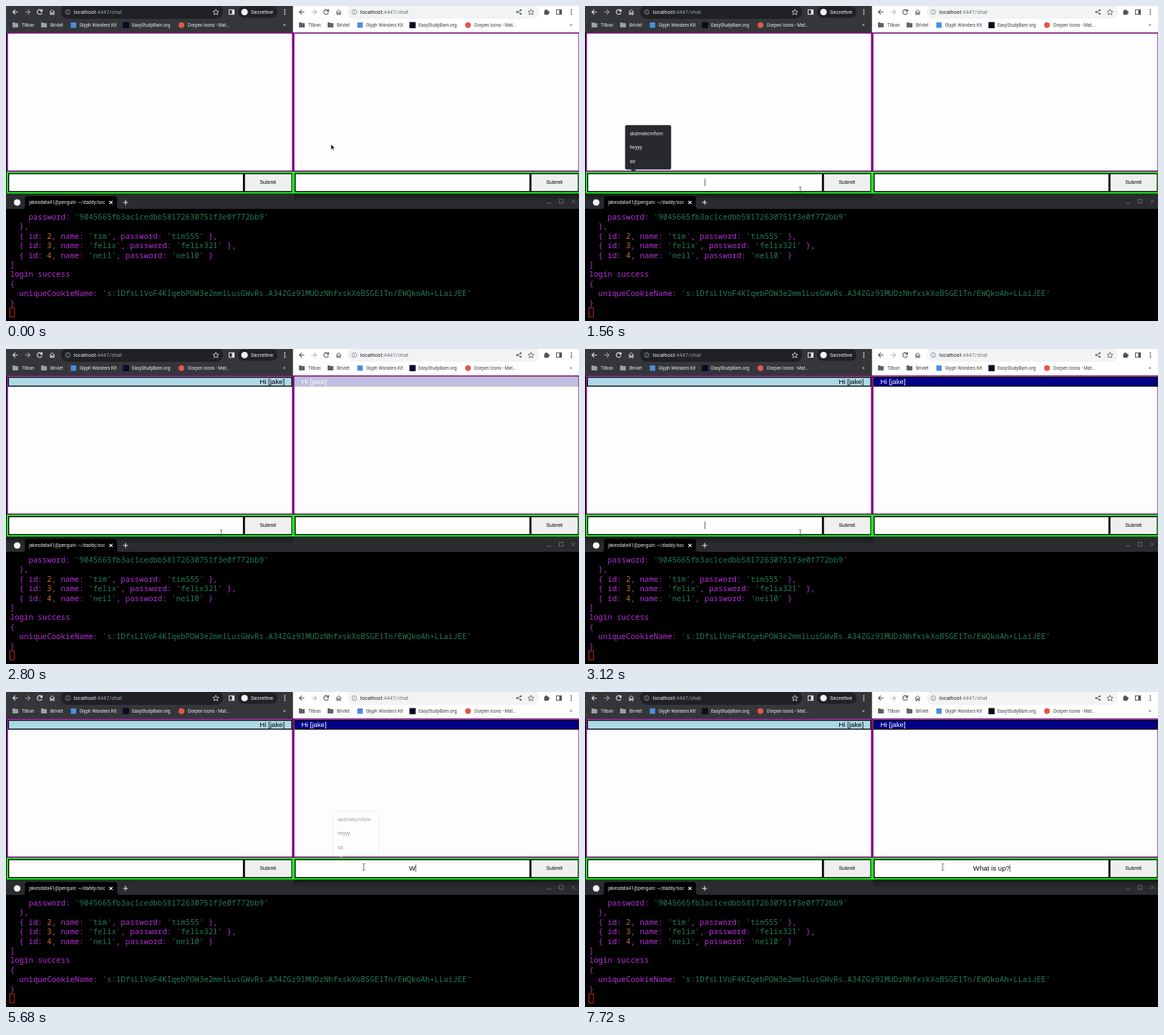
An HTML page that plays this animation: 800x441 px, repeating every 8 s.

```html
<!DOCTYPE html>
<html lang="en">
<head>
<meta charset="utf-8">
<title>Chat demo</title>
<style>
html, body { margin: 0; width: 100%; height: 100%; overflow: hidden; background: #000; }
svg { display: block; width: 800px; height: 441px; }
text { white-space: pre; }
.ui { font-family: Roboto, sans-serif; }
.page { font-family: "Liberation Sans", Arial, sans-serif; }
.term { font: 10.74px "Noto Sans Mono", monospace; }
</style>
</head>
<body>
<svg id="stage" viewBox="0 0 800 441" xmlns="http://www.w3.org/2000/svg">
  <defs>
    <linearGradient id="shade" x1="0" y1="0" x2="0" y2="1">
      <stop offset="0" stop-color="#000" stop-opacity=".4"/>
      <stop offset="1" stop-color="#000" stop-opacity="0"/>
    </linearGradient>
    <clipPath id="tabClip"><rect x="30" y="266" width="108" height="18"/></clipPath>
  </defs>
</svg>
<script>
const NS = 'http://www.w3.org/2000/svg';
const stage = document.getElementById('stage');
const LOOP = 8000;

function add(parent, tag, attrs, content) {
  const el = document.createElementNS(NS, tag);
  for (const k in attrs) el.setAttribute(k, attrs[k]);
  if (content !== undefined) el.textContent = content;
  parent.appendChild(el);
  return el;
}
const group = (parent, attrs) => add(parent, 'g', attrs || {});
const rect = (p, x, y, width, height, fill, more) => add(p, 'rect', { x, y, width, height, fill, ...more });
const line = (p, d, stroke, w, more) => add(p, 'path', { d, stroke, 'stroke-width': w, fill: 'none', ...more });
const dot = (p, cx, cy, r, fill) => add(p, 'circle', { cx, cy, r, fill });
const label = (p, x, y, size, fill, str, cls, more) =>
  add(p, 'text', { x, y, 'font-size': size, fill, class: cls || 'ui', ...more }, str);

const STAR = 'M293 4.6l1.2 2.6 2.9.3-2.2 1.9.7 2.8-2.6-1.5-2.6 1.5.7-2.8-2.2-1.9 2.9-.3z';

function navIcons(g, on, off) {
  line(g, 'M16.5 8.5H9.8M13 5.2L9.7 8.5l3.3 3.3', on, 1.1);
  line(g, 'M26.7 8.5h6.8M30.2 5.2l3.3 3.3-3.3 3.3', off, 1.1);
  line(g, 'M49.6 6.4A3.3 3.3 0 1 0 50.2 9.3M50.4 4.6v2.8h-2.8', on, 1.1);
  line(g, 'M61 8.6l3.5-3.3 3.5 3.3M62 8v4h1.6V9.5h1.8V12H67V8', on, 1);
}

function toolbar(dx, dark) {
  const g = group(stage, { transform: `translate(${dx})` });
  const ink = dark ? '#e8eaed' : '#4d5156';
  const dim = dark ? '#9aa0a6' : '#80868b';
  rect(g, dark ? 0 : .6, 0, 400.6, 37, dark ? '#35363a' : '#fff');
  rect(g, 77, -2, dark ? 226 : 267, 20, dark ? '#202124' : '#f1f3f4', { rx: 9.5 });
  navIcons(g, ink, dark ? '#9aa0a6' : '#b5b8bc');

  add(g, 'circle', { cx: 86.3, cy: 8.5, r: 3.3, fill: 'none', stroke: dim, 'stroke-width': .8 });
  line(g, 'M86.3 8v2.4M86.3 6.4v.9', dim, .8);
  const url = label(g, 94.7, 11.2, 7.5, dark ? '#e8eaed' : '#202124', '');
  add(url, 'tspan', {}, 'localhost');
  add(url, 'tspan', { fill: dark ? '#9aa0a6' : '#70757a' }, ':4447/chat');

  line(g, STAR, ink, .8, dark ? {} : { transform: 'translate(40)' });
  const px = dark ? 311.5 : 368.5;
  rect(g, px, 5.3, 7, 6.4, 'none', { stroke: ink, 'stroke-width': 1 });
  rect(g, px + 4, 5.3, 3, 6.4, ink);
  if (dark) {
    rect(g, 324, .5, 55, 16, '#202124', { rx: 8 });
    dot(g, 333, 8.5, 4.6, '#f1f3f4');
    label(g, 342, 11.2, 7.6, '#f1f3f4', 'Secretive');
  } else {
    line(g, 'M318.5 6.2l-4.8 2.3 4.8 2.3', ink, .8);
    [[318.6, 6], [313.6, 8.5], [318.6, 11]].forEach(([x, y]) => dot(g, x, y, 1.2, ink));
    rect(g, 351.5, 6.2, 6, 6, ink, { rx: .6 });
    dot(g, 354.3, 6, 1.3, ink);
    dot(g, 357.7, 9, 1.3, ink);
  }
  [5.5, 8.5, 11.5].forEach(y => dot(g, 389.3, y, .9, ink));

  const folder = x => add(g, 'path', {
    d: `M${x} 23.5q0-.6.6-.6h2.5l1 1h3.4q.6 0 .6.6v4.8q0 .6-.6.6h-6.9q-.6 0-.6-.6z`,
    fill: dark ? '#9aa0a6' : '#5f6368'
  });
  folder(9);
  folder(49);
  rect(g, 90.5, 23, 7.5, 7.5, '#4a8fe0');
  rect(g, 163.3, 22.5, 8.6, 8.6, '#0a0a23');
  dot(g, 245, 26.7, 4, '#e2574c');
  const names = [[22, 'Tilbon'], [62, 'Brivlet'], [102.7, 'Glyph Wonders Kit'],
    [176, 'EasyStudyBarn.org'], [254, 'Dorpen Icons - Mat...']];
  names.forEach(([x, s]) => label(g, x, 29, 6.35, dark ? '#e8eaed' : '#3c4043', s));
  label(g, 386.8, 29, 8, ink, '»');
}

// One chat page; returns the parts that change.
function chatPage(dx, mine) {
  const g = group(stage, { transform: `translate(${dx})` });
  rect(g, 1, 37, 400, 195, '#7a0a7d');
  rect(g, 2.7, 38.6, 396.6, 191.8, '#fdfcfe');
  const msg = group(g, { opacity: 0 });
  rect(msg, 3.4, 39.6, 395.6, 12.4, mine ? '#add8e6' : '#00008b', { stroke: '#000', 'stroke-width': 1.4 });
  label(msg, mine ? 389.2 : 12.6, 48.8, 9.7, mine ? '#000' : '#fff', 'Hi [jake]', 'page',
    { 'text-anchor': mine ? 'end' : 'start' });

  rect(g, 1, 232, 400, 30.5, '#1eff1e');
  rect(g, 3, 234, 396.4, 26.5, '#000');
  rect(g, 4.4, 235.4, 326.4, 23.7, '#fff');
  rect(g, 333.6, 235.4, 64.8, 23.7, '#efefef');
  label(g, 365.6, 249.1, 7.35, '#000', 'Submit', 'page', { 'text-anchor': 'middle' });
  const text = label(g, 167.4, 250.1, 9.7, '#000', '', 'page', { 'text-anchor': 'middle' });
  const caret = rect(g, 0, 241.5, .7, 10.6, '#222');
  return { g, msg, text, caret };
}

function popup(dx, dark) {
  const g = group(stage, { transform: `translate(${dx})`, opacity: 0 });
  const bg = dark ? '#28292c' : '#fff';
  const edge = dark ? '#333437' : '#c4c6c9';
  const box = rect(g, 56.2, 167, 63.8, 61.7, bg, { rx: 2, stroke: edge, 'stroke-width': .6 });
  add(g, 'path', { d: 'M63.5 228.8l4 3.6 4-3.6z', fill: dark ? bg : '#e4e5e7' });
  const rows = ['skdmekcmfem', 'heyyy', 'sd'].map((s, i) =>
    label(g, 62.4, 181.1 + i * 19.2, 7, dark ? '#e8eaed' : '#202124', s));
  return { g, box, rows };
}

function terminal() {
  const g = group(stage);
  rect(g, 0, 262.5, 800, 179, '#000');
  rect(g, 0, 262.5, 800, 21.5, '#2a2b2e');
  add(g, 'path', { d: 'M23 284q3.5 0 3.5-3.5v-10.5q0-4 4-4h120.5q4 0 4 4v10.5q0 3.5 3.5 3.5z', fill: '#000' });
  dot(g, 15.6, 275, 4.6, '#f1f3f4');
  label(g, 32.2, 277.4, 6.6, '#e8eaed', 'jakesdata41@penguin: ~/daddy/socket', 'ui', { 'clip-path': 'url(#tabClip)' });
  line(g, 'M144.3 272.8l4.4 4.4m0-4.4l-4.4 4.4', '#fff', 1.1);
  line(g, 'M163.5 275h7M167 271.5v7', '#e8eaed', 1.1);
  line(g, 'M755 276h6M772.5 270.7h5.4v5.4h-5.4zM789.4 270.8l5.3 5.3m0-5.3l-5.3 5.3', '#77797d', .8);

  const user = (id, name, pass, end) => `  { id: #${id}#, name: '${name}', password: '${pass}' }${end}`;
  const rows = [
    "    password: '9045665fb3ac1cedbb58172630751f3e0f772bb9'",
    '  },',
    user(2, 'tim', 'tim555', ','),
    user(3, 'felix', 'felix321', ','),
    user(4, 'neil', 'neil0', ''),
    ']',
    'login success',
    '{',
    "  uniqueCookieName: 's:1DfsL1VoF4KIqebPOW3e2mm1LusGWvRs.A34ZGz9lMUDzNhfxskXoBSGE1Tn/EWQkoAh+LLaiJEE'",
    '}'
  ];
  rows.forEach((row, i) => {
    const t = add(g, 'text', { x: 5.7, y: 298.9 + i * 13.4, class: 'term' });
    row.split(/('[^']*'|#\d#)/).forEach(part => {
      const fill = part[0] === "'" ? '#227a55' : part[0] === '#' ? '#c0702a' : '#b72fd8';
      add(t, 'tspan', { fill }, part.replace(/#/g, ''));
    });
  });
  rect(g, 5.5, 422.8, 6.2, 12.4, 'none', { stroke: '#c42a16', 'stroke-width': 1 });
}

terminal();
const shadow = rect(stage, 0, 262.5, 402, 11, 'url(#shade)');
const left = chatPage(0, true);
const right = chatPage(400, false);
toolbar(0, true);
toolbar(400, false);
const popL = popup(0, true);
const popR = popup(400.5, false);

const mouse = group(stage);
const arrow = add(mouse, 'path', {
  d: 'M0 0v7.4l1.7-1.5 1.2 2.6 1.3-.6-1.2-2.5h2.3z',
  fill: '#000', stroke: '#fff', 'stroke-width': .6
});
const beam = line(mouse, 'M-2-4.6h1.4L0-4l.6-.6H2M0-4V4M-2 4.6h1.4L0 4l.6.6H2', '#55575a', .8);

const ramp = (t, a, b) => Math.max(0, Math.min(1, (t - a) / (b - a)));
const smooth = p => p * p * (3 - 2 * p);
const within = (t, a, b) => t >= a && t < b;
const show = (el, on) => el.setAttribute('visibility', on ? 'visible' : 'hidden');

const CLICK_L = 600, CLICK_R = 4400, SEND = 2320;
const KEYS_L = [1760, 2000];
const KEYS_R = [5600, 5760, 5880, 6000, 6160, 6320, 6840, 6920, 7000, 7200, 7720];
const typed = (str, keys, t) => str.slice(0, keys.filter(k => t >= k).length);

// The caret blinks every 480 ms, counted from the last click or key.
function blink(t, marks) {
  const last = marks.filter(m => t >= m).pop();
  return last !== undefined && Math.floor((t - last) / 480) % 2 === 0;
}

function setField(page, str, caretOn) {
  if (page.text.textContent !== str) page.text.textContent = str;
  const w = str ? page.text.getComputedTextLength() : 0;
  page.caret.setAttribute('x', 167.2 + w / 2);
  show(page.caret, caretOn);
}

function moveMouse(t) {
  const a = smooth(ramp(t, 20, 580));
  const b = smooth(ramp(t, 3400, 3960));
  const x = 453.7 - 153.2 * a + 199 * b;
  const y = 193.6 + 64 * a - 12.6 * b;
  const inField = y > 234 && y < 261 && (x % 400) > 3 && (x % 400) < 331;
  mouse.setAttribute('transform', `translate(${x} ${y})`);
  show(arrow, !inField);
  show(beam, inField);
}

function draw(t) {
  moveMouse(t);
  const onLeft = within(t, CLICK_L, CLICK_R);
  shadow.setAttribute('x', onLeft ? 0 : 402);

  setField(left, t < SEND ? typed('Hi', KEYS_L, t) : '', onLeft && blink(t, [CLICK_L, ...KEYS_L, 2040]));
  setField(right, typed('What is up?', KEYS_R, t), t >= CLICK_R && blink(t, [CLICK_R, ...KEYS_R]));

  left.msg.setAttribute('opacity', ramp(t, SEND, 2720));
  right.msg.setAttribute('opacity', ramp(t, 2720, 3060));

  popL.g.setAttribute('opacity', ramp(t, CLICK_L, 800) * (1 - ramp(t, 2000, 2160)));
  popR.g.setAttribute('opacity', ramp(t, CLICK_R, 4640) * (1 - ramp(t, 5600, 5740)));
  // Typing H leaves a single matching suggestion.
  const few = t >= KEYS_L[0];
  popL.box.setAttribute('y', few ? 205 : 167);
  popL.box.setAttribute('height', few ? 23.7 : 61.7);
  popL.rows.forEach((row, i) => show(row, !few || i === 1));
  popL.rows[1].setAttribute('y', few ? 219.5 : 200.3);
}

function tick() {
  draw(performance.now() % LOOP);
  requestAnimationFrame(tick);
}
tick();
</script>
</body>
</html>
```
